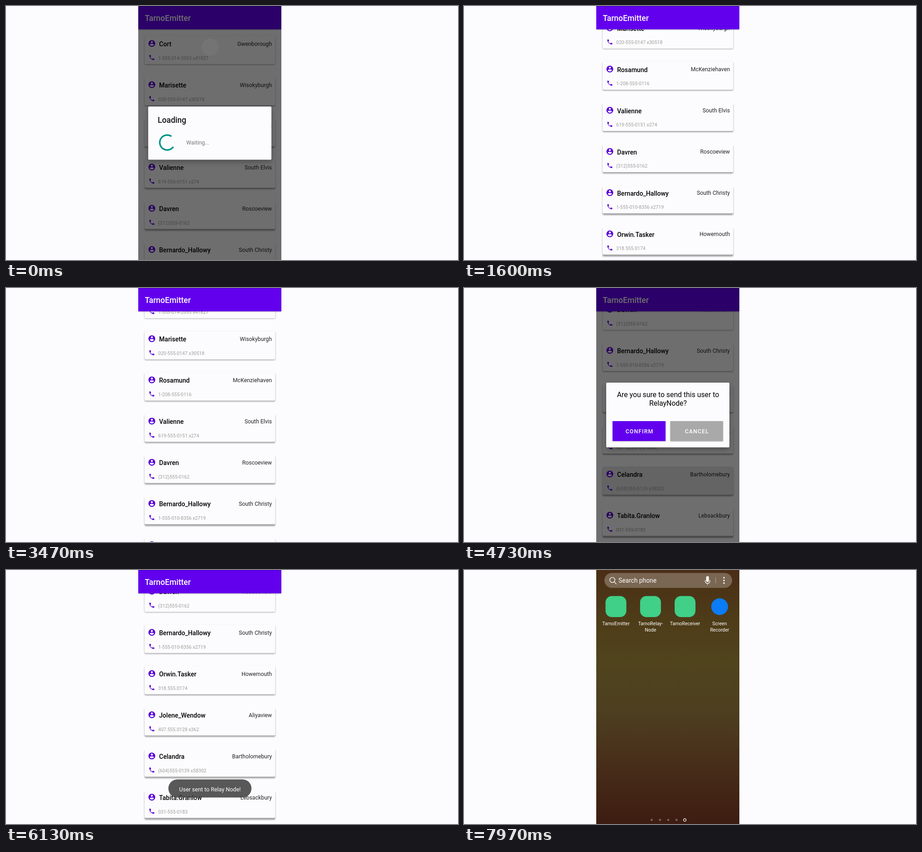
Recreate the animation shown at these times as an HTML page. Size 998 px wide and 561 px high, loop 8 s.

```html
<!DOCTYPE html>
<html lang="en">
<head>
<meta charset="utf-8">
<title>Contact list</title>
<style>
  html, body { margin: 0; width: 100%; height: 100%; overflow: hidden; background: #fcfcfe; }
  svg { display: block; width: 998px; height: 561px; font-family: Roboto, sans-serif; font-size: 12.3px; }
  .medium { font-weight: 500; }
  .middle { text-anchor: middle; }
  .end { text-anchor: end; }
  .title { font-size: 17.5px; }
  .name { font-size: 14.05px; }
  .phone { font-size: 10.5px; fill: #9d9d9a; }
  .question { font-size: 15.8px; }
  .button { font-weight: 500; letter-spacing: 1.1px; fill: #fff; }
  .panel { filter: drop-shadow(0 5px 6px rgba(0, 0, 0, .28)); }
  .raised { filter: drop-shadow(0 1px 1px rgba(0, 0, 0, .3)); }
  .label { font-size: 10.5px; fill: #fff; text-anchor: middle; }
</style>
</head>
<body>
<svg viewBox="0 0 998 561">
  <defs>
    <clipPath id="screen"><rect x="292" width="316" height="561"/></clipPath>
    <filter id="soft" x="-5%" y="-20%" width="110%" height="140%"><feGaussianBlur stdDeviation="1.5"/></filter>
    <linearGradient id="wallpaper" x2="0" y2="1">
      <stop offset="0" stop-color="#4a2e16"/>
      <stop offset=".2" stop-color="#4e3c18"/>
      <stop offset=".36" stop-color="#50441d"/>
      <stop offset=".55" stop-color="#4d3f20"/>
      <stop offset=".75" stop-color="#482f1a"/>
      <stop offset="1" stop-color="#3d1c11"/>
    </linearGradient>
    <g id="person">
      <circle cx="12" cy="12" r="10" fill="#5900d9"/>
      <g fill="#fcfcfe">
        <circle cx="12" cy="8" r="3"/>
        <path d="M6 16q0-3 6-3t6 3q-2 3.2-6 3.2t-6-3.2z"/>
      </g>
    </g>
    <path id="handset" fill="#5900d9" d="M6.6 10.8c1.4 2.8 3.8 5.1 6.6 6.6l2.2-2.2c.3-.3.7-.4 1-.2 1.1.4 2.3.6 3.6.6.6 0 1 .4 1 1V20c0 .6-.4 1-1 1-9.4 0-17-7.6-17-17 0-.6.5-1 1-1h3.5c.6 0 1 .5 1 1 0 1.3.2 2.5.6 3.6.1.3 0 .7-.3 1z"/>
  </defs>

  <g clip-path="url(#screen)">
    <g id="home">
      <rect x="292" width="316" height="561" fill="url(#wallpaper)"/>
      <rect x="310" y="6.5" width="282" height="33" rx="16.5" fill="#fff" opacity=".26"/>
      <g fill="none" stroke="#fff" stroke-width="1.3" stroke-linecap="round">
        <circle cx="327.5" cy="22" r="5.7"/>
        <path d="M331.7 26.2l4.5 4.6M532.5 23v1.5a5.2 5.2 0 0 0 10.4 0V23M537.7 29.5V32"/>
        <path d="M555.5 17v12" opacity=".35"/>
      </g>
      <rect x="534.7" y="13.5" width="6" height="13" rx="3" fill="#fff"/>
      <text x="341" y="28" font-size="13.8" fill="#fff">Search phone</text>
      <g id="menuDots" fill="#fff"></g>
      <g id="apps"></g>
      <g id="pages"></g>
    </g>

    <g id="app">
      <rect x="292" width="316" height="561" fill="#fcfcfe"/>
      <g id="list"></g>
      <rect class="raised" x="292" y="-2" width="316" height="53.5" fill="#6200ee"/>
      <rect x="292" width="316" height="1" fill="#4800c0"/>
      <text class="title medium" x="306.5" y="33" fill="#fff">TarnoEmitter</text>

      <rect id="dim" x="292" width="316" height="561"/>
      <circle id="refresh" cx="451" cy="91" r="19" fill="#fff"/>

      <g id="loading">
        <rect class="panel" x="314" y="222" width="272" height="117.5" rx="2" fill="#fcfcfe"/>
        <text class="title medium" x="335" y="258" fill="#141414">Loading</text>
        <circle id="spinner" cx="356" cy="301.5" r="16.5" fill="none" stroke="#009688" stroke-width="3.5" pathLength="360"/>
        <text x="398" y="306.3" fill="#757575">Waiting...</text>
      </g>

      <g id="confirm">
        <rect class="panel" x="314" y="209" width="272" height="143" rx="2" fill="#fcfcfe"/>
        <g class="question middle">
          <text x="450.5" y="241">Are you sure to send this user to</text>
          <text x="450.5" y="260">RelayNode?</text>
        </g>
        <rect class="raised" x="328" y="294" width="117" height="44" fill="#6200ee"/>
        <rect class="raised" x="455.5" y="294" width="116.5" height="44" fill="#a9a9a9"/>
        <text class="button middle" x="387.5" y="321">CONFIRM</text>
        <text class="button middle" x="514.3" y="321">CANCEL</text>
      </g>

      <g id="toast">
        <rect x="358.5" y="462.5" width="183.5" height="40" rx="20" fill="#3c3c3c" opacity=".85"/>
        <text class="middle" x="450.3" y="488.5" font-size="12.5" fill="#fff">User sent to Relay Node!</text>
      </g>
    </g>
  </g>
</svg>
<script>
const LOOP = 8000, ROW = 91, TOP = 66, DIM = .56;
const $ = id => document.getElementById(id);

const contacts = [
  ['Cort', 'Gwenborough', '1-555-014-2093 x41827'],
  ['Marisette', 'Wisokyburgh', '020-555-0147 x30518'],
  ['Rosamund', 'McKenziehaven', '1-208-555-0116'],
  ['Valienne', 'South Elvis', '619-555-0151 x274'],
  ['Davren', 'Roscoeview', '(312)555-0162'],
  ['Bernardo_Hallowy', 'South Christy', '1-555-010-8356 x2719'],
  ['Orwin.Tasker', 'Howemouth', '318.555.0174'],
  ['Jolene_Wendow', 'Aliyaview', '407.555.0128 x362'],
  ['Celandra', 'Bartholomebury', '(604)555-0139 x58302'],
  ['Tabita.Granlow', 'Lebsackbury', '031-555-0183']
];
const PICKED = 8;

$('list').innerHTML = contacts.map(([name, city, phone]) => `<g>
  <rect class="shade" x="306" width="288.5" height="62.5" rx="3" opacity=".36" filter="url(#soft)"/>
  <rect x="306" width="288.5" height="62.5" rx="3" fill="#fcfcfe"/>
  <rect class="ripple" x="306" width="288.5" height="62.5" rx="3" opacity="0"/>
  <use href="#person" transform="translate(313 7.7) scale(.75)"/>
  <use href="#handset" transform="translate(314.6 40.5) scale(.61)"/>
  <text class="name medium" x="338" y="23">${name}</text>
  <text class="end" x="587" y="21.7" fill="#222">${city}</text>
  <text class="phone" x="336" y="52.5">${phone}</text>
</g>`).join('');

const label = (x, lines) => lines.map((line, i) =>
  `<text class="label" x="${x}" y="${121.5 + i * 14.5}">${line}</text>`).join('');
$('apps').innerHTML = [
  ['TarnoEmitter'], ['TarnoRelay-', 'Node'], ['TarnoReceiver'], ['Screen', 'Recorder']
].map((lines, i) => {
  const x = 335.5 + i * 76.3;
  const icon = i < 3
    ? `<rect x="${x - 23}" y="57.5" width="46" height="46.5" rx="14" fill="#40d088"/>`
    : `<circle cx="${x}" cy="81" r="18.5" fill="#0a7cf5"/>`;
  return icon + label(x, lines);
}).join('');
$('menuDots').innerHTML = [17, 23, 29].map(y => `<circle cx="574" cy="${y}" r="1.7"/>`).join('');
$('pages').innerHTML = [0, 1, 2, 3, 4].map(i =>
  `<circle cx="${414.3 + i * 18.3}" cy="552" ${i < 4
    ? 'r="2.4" fill="#fff" opacity=".3"'
    : 'r="2.9" fill="none" stroke="#fff" stroke-width="1.2"'}/>`).join('');

// Tables of [time, value], linear between the steps.
const tracks = {
  scroll: [[1350, 0], [1450, 45], [1600, 125], [1800, 208], [2070, 272.5], [2300, 300], [2430, 300],
    [2530, 255], [2700, 130], [2900, 35], [3070, 0], [3370, 0], [3470, 61], [3600, 165],
    [3800, 300], [4000, 375], [4170, 400]],
  dim: [[850, DIM], [970, .25], [1060, 0], [4400, 0], [4600, DIM], [5830, DIM], [6050, 0]],
  loading: [[830, 1], [950, 0]],
  confirm: [[4400, 0], [4550, 1], [5800, 1], [5930, 0]],
  ripple: [[4230, 0], [4380, .09], [4800, .09], [5000, 0]],
  refresh: [[0, .04], [200, 0]],
  toast: [[5870, 0], [6100, 1], [7090, 1], [7470, 0]],
  app: [[7770, 1], [7940, 0]]
};

function at(track, t) {
  const i = track.findIndex(([time]) => time > t);
  if (i < 0) return track[track.length - 1][1];
  if (i === 0) return track[0][1];
  const [t0, a] = track[i - 1], [t1, b] = track[i];
  return a + (b - a) * (t - t0) / (t1 - t0);
}

const ease = x => {
  const p = Math.min(1, Math.max(0, x));
  return p * p * (3 - 2 * p);
};

function zoom(node, k, x, y) {
  node.setAttribute('transform', `translate(${x * (1 - k)} ${y * (1 - k)}) scale(${k})`);
}

function fade(id, t) {
  const value = at(tracks[id], t), node = $(id);
  node.setAttribute('opacity', value);
  node.style.display = value ? '' : 'none';
  return value;
}

function spin(t) {
  const cycles = t / 1333 + .47, phase = cycles % 1;
  const head = 262 * ease(2 * phase), tail = 262 * ease(2 * phase - 1);
  const sweep = 10 + head - tail;
  const angle = 35 + Math.floor(cycles) * 262 + tail + t * .1755;
  $('spinner').setAttribute('stroke-dasharray', `${sweep} ${360 - sweep}`);
  $('spinner').setAttribute('transform', `rotate(${angle} 356 301.5)`);
}

const cards = [...$('list').children];
const shades = cards.map(card => card.querySelector('.shade'));
const ripple = cards[PICKED].querySelector('.ripple');

function render(t) {
  const scroll = at(tracks.scroll, t);
  cards.forEach((card, i) => {
    const y = TOP + i * ROW - scroll;
    card.style.display = y > -20 && y < 570 ? '' : 'none';
    card.setAttribute('transform', `translate(0 ${y})`);
    // Shadows fall further the lower a card stands on the screen.
    shades[i].setAttribute('y', .8 + Math.max(0, y) * .007);
  });
  ripple.setAttribute('opacity', at(tracks.ripple, t));
  ['dim', 'refresh', 'toast'].forEach(id => fade(id, t));
  zoom($('loading'), .9 + .1 * fade('loading', t), 450, 281);
  zoom($('confirm'), .9 + .1 * fade('confirm', t), 450, 281);
  zoom($('app'), .85 + .15 * fade('app', t), 450, 281);
  $('home').style.display = t > 7770 ? '' : 'none';
  spin(t);
}

function tick() {
  render(performance.now() % LOOP);
  requestAnimationFrame(tick);
}
tick();
</script>
</body>
</html>
```
